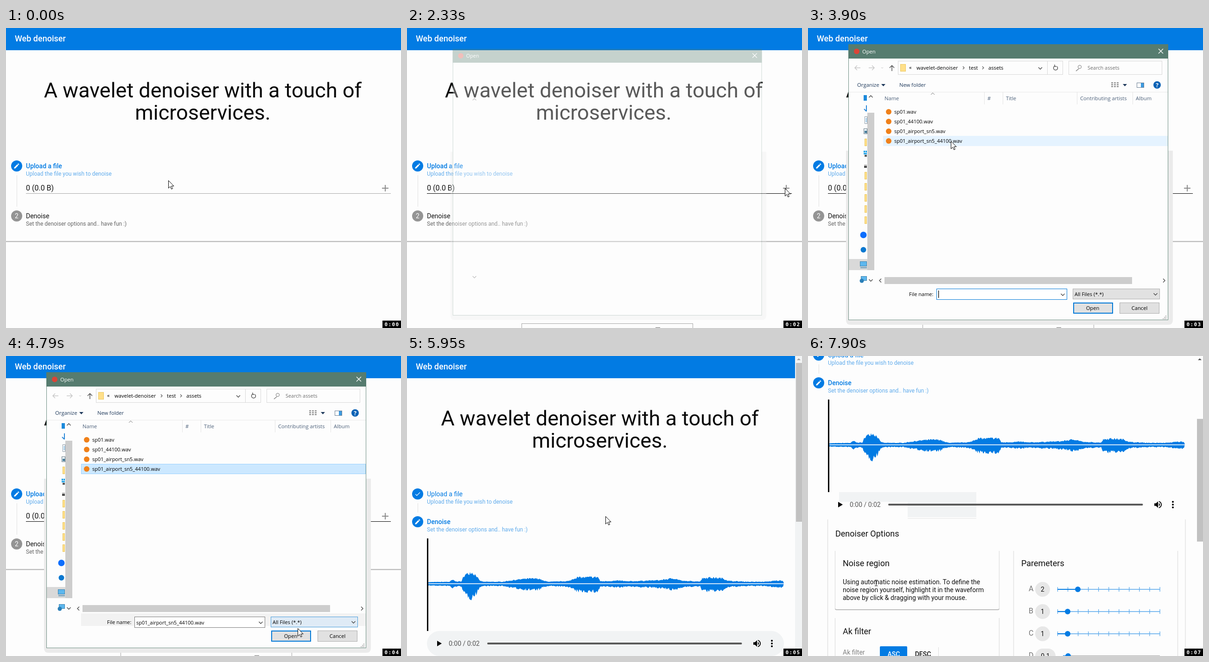
An HTML page for the animation above (8000 ms loop, 852 by 648 pixels).

```html
<!DOCTYPE html>
<html lang="en">
<head>
<meta charset="utf-8">
<title>Web denoiser</title>
<style>
html, body { margin: 0; width: 100%; height: 100%; overflow: hidden; background: #fdfdfd; }
svg { display: block; width: 852px; height: 648px; font-family: Roboto, sans-serif; }
text { white-space: pre; }
.ui { font-family: "Open Sans", sans-serif; }
.mid { text-anchor: middle; }
</style>
</head>
<body>
<svg id="stage" viewBox="0 0 852 648"></svg>
<script>
const BLUE = '#027be3', SOFT = '#5fabec', BG = '#fdfdfd', INK = '#111';

const text = (x, y, s, size = 14, fill = INK, extra = '') =>
  `<text x="${x}" y="${y}" font-size="${size}" fill="${fill}" ${extra}>${s}</text>`;
const ui = (x, y, s, fill = '#000', size = 11.2, cls = '') =>
  text(x, y, s, size, fill, `class="ui ${cls}"`);
const rect = (x, y, w, h, fill, extra = '') =>
  `<rect x="${x}" y="${y}" width="${w}" height="${h}" fill="${fill}" ${extra}/>`;
const box = (x, y, w, h, fill, stroke, extra = '') =>
  rect(x + .5, y + .5, w - 1, h - 1, fill, `stroke="${stroke}" ${extra}`);
const line = (d, stroke, w = 1, extra = '') =>
  `<path d="${d}" fill="none" stroke="${stroke}" stroke-width="${w}" ${extra}/>`;
const shape = (d, fill, extra = '') => `<path d="${d}" fill="${fill}" ${extra}/>`;
const dot = (x, y, r, fill) => `<circle cx="${x}" cy="${y}" r="${r}" fill="${fill}"/>`;
const icon = (d, x, y, k, fill) => shape(d, fill, `transform="translate(${x} ${y}) scale(${k}) translate(-12 -12)"`);
const chevron = (x, y, dx, dy, c = '#444', w = 1.3) => dx
  ? line(`M${x - dx} ${y - 4}L${x + dx} ${y}L${x - dx} ${y + 4}`, c, w)
  : line(`M${x - 4} ${y - dy}L${x} ${y + dy}L${x + 4} ${y - dy}`, c, w);
const group = (id, body, extra = '') => `<g id="${id}" ${extra}>${body}</g>`;

const PENCIL = 'M3 17.25V21h3.75L17.81 9.94l-3.75-3.75L3 17.25zM20.71 7.04c.39-.39.39-1.02 0-1.41l-2.34-2.34c-.39-.39-1.02-.39-1.41 0l-1.83 1.83 3.75 3.75 1.83-1.83z';
const CHECK = 'M9 16.17L4.83 12l-1.42 1.41L9 19 21 7l-1.41-1.41z';
const SOUND = 'M3 9v6h4l5 5V4L7 9H3zm13.5 3c0-1.77-1.02-3.29-2.5-4.03v8.05c1.48-.73 2.5-2.25 2.5-4.02zM14 3.23v2.06c2.89.86 5 3.54 5 6.71s-2.11 5.85-5 6.71v2.06c4.01-.91 7-4.49 7-8.77s-2.99-7.86-7-8.77z';

const top_ = (w, cx) => rect(0, 0, w, 48, BLUE) +
  text(19, 28.5, 'Web denoiser', 18, '#fff', 'font-weight="500"') +
  text(cx, 149.5, 'A wavelet denoiser with a touch of', 45, '#0a0a0a', 'class="mid"') +
  text(cx, 197.5, 'microservices.', 45, '#0a0a0a', 'class="mid"');

const step = (y, mark, title, sub, bold, titleFill, subFill) =>
  dot(23, y, 12, mark ? BLUE : '#949494') +
  (mark ? icon(mark, 23, y, .6, '#fff') : text(23, y + 5, '2', 14, '#fff', 'class="mid"')) +
  text(43, y + 5, title, 14, titleFill, `font-weight="${bold ? 500 : 400}"`) +
  text(43, y + 21, sub, 12, subFill);

const UPLOAD = ['Upload a file', 'Upload the file you wish to denoise'];
const DENOISE = ['Denoise', 'Set the denoiser options and.. have fun :)'];

function uploadPage() {
  return top_(852, 424.5) +
    step(298, PENCIL, ...UPLOAD, true, BLUE, SOFT) +
    step(406, '', ...DENOISE, false, INK, '#666') +
    line('M23.5 318V386', '#e0e0e0') +
    text(43, 351, '0 (0.0 B)', 16, INK) +
    line('M43 357.5H830', '#a6a6a6', 1, 'id="underline"') +
    line('M811 346H825M818 339V353', '#8c8c8c', 2) +
    rect(0, 460, 852, 2, '#bcbcbc') + rect(0, 462, 852, 1, '#e8e8e8');
}

function waveform() {
  const env = [[46, 3], [92, 4], [98, 9], [105, 5], [118, 5], [122, 19], [138, 29], [150, 20], [156, 7],
    [165, 4], [205, 4], [235, 9], [260, 12], [285, 12], [295, 6], [310, 4], [350, 6], [365, 15],
    [412, 16], [417, 5], [460, 7], [475, 5], [520, 7], [545, 8], [575, 13], [595, 6], [632, 5],
    [637, 13], [650, 15], [680, 13], [695, 6], [740, 4], [770, 4], [800, 7], [813, 7]];
  let seed = 7;
  const rnd = () => (seed = seed * 16807 % 2147483647) / 2147483647;
  let up = '', down = '';
  for (let x = 46; x <= 812; x += 1.5) {
    const a = track(env, x)[0];
    up += `L${x} ${(491 - a * (.68 + .3 * rnd())).toFixed(1)}`;
    down = `L${x} ${(492.5 + a * (.75 + .5 * rnd())).toFixed(1)}` + down;
  }
  return shape('M46 491' + up + 'L813 491' + down + 'Z', BLUE) + rect(46, 491, 767, 1.6, '#fff');
}

const card = (x, y, w, h) =>
  line(`M${x + .5} ${y + 4}V${y + h - 2}M${x + w - .5} ${y + 4}V${y + h - 2}`, '#e2e2e2', 1.5) +
  line(`M${x + 1} ${y + h - 2}q0 2 3 2H${x + w - 4}q3 0 3 -2`, '#bdbdbd', 1.8);

function slider(name, value, y, knob, x0 = 538, wide = 0) {
  const c = wide ? '#a0a0a0' : '#7dbbf0';
  let ticks = '';
  for (let i = 0; i <= 10 && !wide; i++) ticks += `M${538.5 + 22.05 * i} ${y - 5}v10`;
  return text(476, y + 4, name, 16, '#757575') +
    rect(490, y - 16, 32 + wide, 32, '#e7e7e7', 'rx="16"') +
    text(506 + wide / 2, y + 5, value, 14, INK, 'class="mid"') +
    line(`M${x0} ${y}H759`, c, 1.8) + line(ticks, SOFT, 1.3) +
    line(`M${x0} ${y}H${knob}`, BLUE, 2.2) + dot(knob, y, 6, BLUE);
}

function denoisePage() {
  const content = rect(43, 394, 3, 200, '#000') + waveform() +
    rect(43, 594, 770, 54, '#f1f3f4', 'id="pill" rx="27"') +
    group('patch', shape('M67 594H363V648H215V615H67Z', '#f1f3f4') + rect(215, 650, 148, 1.5, '#ececec')) +
    shape('M65 615L75 621L65 627Z', '#000') +
    text(90, 626, '0:00 / 0:02', 14, '#555') +
    rect(173, 619, 549.5, 4, '#5a5a5a', 'rx="2"') + icon(SOUND, 755, 621, .88, '#000') +
    [615, 621, 627].map(y => dot(787, y, 2, '#000')).join('') +
    line('M42.5 653V1400M814 653V1400', '#e2e2e2', 1.5) +
    text(59, 690, 'Denoiser Options', 18) +
    card(58, 717, 355, 131) + text(75, 754, 'Noise region', 18) +
    ['Using automatic noise estimation. To define the', 'noise region yourself, highlight it in the waveform',
      'above by click &amp; dragging with your mouse.'].map((s, i) => text(75, 793 + 17 * i, s)).join('') +
    card(58, 862, 355, 200) + text(75, 901, 'Ak filter', 18) + text(75, 945, 'Ak filter', 14, '#808080') +
    rect(155, 927, 59, 36, BLUE, 'rx="2"') + line('M281.5 929V963', '#ddd') +
    text(185, 949, 'ASC', 14, '#fff', 'class="mid" font-weight="500"') +
    text(248, 949, 'DESC', 14, INK, 'class="mid" font-weight="500"') +
    card(443, 717, 355, 400) + text(460, 754, 'Paremeters', 18) +
    slider('A', '2', 804, 582) + slider('B', '1', 852, 560) + slider('C', '1', 900, 560) +
    slider('D', '0.1', 948, 561, 550, 12);
  return top_(837, 416) + step(298, CHECK, ...UPLOAD, false, BLUE, SOFT) +
    line('M23.5 318V338', '#e0e0e0') +
    group('second', step(358, PENCIL, ...DENOISE, true, BLUE, SOFT) + group('content', content));
}

function folder(x, y, w = 5) { return box(x, y, w, 16, '#ffe08a', '#ecc860'); }

function sidebar() {
  return rect(88, 499, 40, 24, '#d9d9d9') +
    rect(120, 145, 7, 12, '#1c8adb') +
    line('M126 167V180M121 175L126 180', '#2b88d8', 2) +
    box(122, 191, 6, 16, '#fff', '#8a9aa8') + line('M124 196h3M124 199h3M124 202h3', '#3b9be0') +
    box(120, 217, 8, 12, '#e9f3fa', '#6d7c88') + rect(122, 222, 5, 5, '#4a7f9c') +
    rect(120, 265, 3, 4, '#1ca0e6') + rect(124, 265, 3, 4, '#1ca0e6') + rect(120, 270, 7, 3, '#1ca0e6') + rect(122, 274, 5, 4, '#555') +
    rect(121, 295, 6, 3, '#bbb') + rect(121, 298, 6, 4, '#444') +
    [239, 311, 335, 359, 383, 407].map(y => folder(122, y)).join('') +
    dot(119.5, 447, 7, '#0d6efd') + dot(119.5, 479, 6, '#0a78d0') +
    box(112, 504, 15, 11, '#5db7ee', '#3f83ad') + rect(113, 517, 14, 1.5, '#3f83ad') +
    box(114, 536, 13, 10, '#5db7ee', '#3f83ad') + dot(116, 546, 4.5, '#2a7fb8') +
    rect(128, 183, 15, 340, '#cdcdcd');
}

function dialogBody() {
  const grey = '#c4c4c4', navy = '#1e395b', head = '#4c607a';
  const arrow = (x, c) => line(`M${x - 6} 86H${x + 6}`, c, 1.4);
  const names = ['sp01.wav', 'sp01_44100.wav', 'sp01_airport_sn5.wav', 'sp01_airport_sn5_44100.wav'];
  let grip = '';
  for (let i = 0; i < 3; i++) for (let j = 2 - i; j < 3; j++) grip += rect(765 + 3 * j, 621 + 3 * i, 2, 2, '#b4b4b4');
  return arrow(107, grey) + line('M106 81L101 86L106 91', grey, 1.4) +
    arrow(137, grey) + line('M138 81L143 86L138 91', grey, 1.4) + line('M158 85l2 2l2 -2', grey) +
    line('M181 93V81M176 86L181 81L186 86', '#555', 1.5) +
    box(194, 71, 356, 30, BG, '#d9d9d9') + line('M516.5 72V100', '#d9d9d9') +
    folder(199, 78, 12) + ui(218, 89, '«') + ui(234, 90, 'wavelet-denoiser') + ui(347, 90, 'test') + ui(389, 90, 'assets') +
    line('M334 83l3 3l-3 3M376 83l3 3l-3 3', '#555', 1.2) + chevron(501, 87, 0, 2) +
    line('M537 83A4.5 4.5 0 1 1 532 82.3M532 79V83H536', '#555', 1.4) +
    box(562, 71, 202, 30, BG, '#d9d9d9') + line('M584 88L578 93', '#777', 1.3) +
    '<circle cx="586" cy="84" r="3.6" fill="none" stroke="#777"/>' + ui(603, 90, 'Search assets', '#6d6d6d', 10.9) +
    ui(106, 127, 'Organize', navy, 11.4) + shape('M158 121H167L162.5 126Z', navy) + ui(197, 127, 'New folder', navy) +
    [0, 1, 2].map(i => line(`M654 ${118.5 + 4 * i}h4M660 ${118.5 + 4 * i}h4M666 ${118.5 + 4 * i}h4`, '#7a7a7a', 2)).join('') +
    shape('M679 121H688L683.5 126Z', navy) +
    box(709, 118, 16, 11, '#fff', '#6a7f94') + rect(718, 119, 6, 9, '#3d9ae0') +
    dot(753, 123, 8, '#0b62b5') + text(753, 127.5, '?', 12, '#fff', 'class="ui mid" font-weight="700"') +
    line('M88 138.5H776', '#e8e8e8') + line('M380.5 139V165M420.5 139V165M580.5 139V165M700.5 139V165', '#e5e5e5') +
    chevron(269, 142, 0, -2, '#777', 1) +
    ui(165, 156, 'Name', head) + ui(387, 156, '#', head) + ui(427, 156, 'Title', head) +
    ui(587, 156, 'Contributing artists', head) + ui(707, 156, 'Album', head) +
    box(162, 233, 614, 22, '#e5f3ff', '#e5f3ff', 'id="row"') +
    names.map((s, i) => dot(174, 181 + 21 * i, 6, '#f08019') + ui(186, 185 + 21 * i, s, '#000', 10.95)).join('') +
    sidebar() + rect(165, 538, 534, 15, '#cdcdcd') +
    chevron(156, 545.5, -2, 0) + chevron(768, 545.5, 2, 0) +
    rect(162, 556, 614, 27, '#f2f2f2', 'id="strip"') +
    ui(218, 579, 'File name:', '#000', 11) +
    box(277, 563, 282, 24, '#fff', BLUE, 'id="field"') + chevron(549.5, 576, 0, 2) +
    rect(281, 567, 1.3, 16, '#000', 'id="caret"') +
    group('picked', ui(281, 580, names[3], '#000', 10.95)) +
    box(571, 563, 188, 23, '#e1e1e1', '#adadad', 'id="combo"') + chevron(749.5, 575, 0, 2) + ui(575, 579, 'All Files (*.*)', '#000', 11) +
    rect(573, 594, 84, 22, '#e1e1e1', 'id="ok" stroke="#0078d7" stroke-width="2"') + ui(614, 609, 'Open', '#000', 11.2, 'mid') +
    box(672, 593, 86, 24, '#e1e1e1', '#adadad') + ui(715, 609, 'Cancel', '#000', 11.2, 'mid') + grip;
}

function dialog() {
  return shape('M82 265H787V631Q787 641 777 641H92Q82 641 82 631Z', '#ebebeb') +
    box(87, 35, 690, 596, BG, '#6f8f84') + rect(87, 35, 690, 31, '#567c6f') +
    dot(105, 50.5, 6, '#db4437') + ui(117, 55, 'Open', '#fff') +
    line('M756 45L766 55M766 45L756 55', '#fff', 1.3) +
    chevron(135.5, 148, 0, -2) + chevron(135.5, 545, 0, 2) + group('body', dialogBody());
}

// Piecewise linear lookup of [key, ...values] rows
function track(rows, t) {
  if (t <= rows[0][0]) return rows[0].slice(1);
  const i = rows.findIndex(r => r[0] >= t);
  if (i < 0) return rows[rows.length - 1].slice(1);
  const a = rows[i - 1], b = rows[i], k = (t - a[0]) / (b[0] - a[0]);
  return a.slice(1).map((v, j) => v + (b[j + 1] - v) * k);
}

const POINTER = [[120, 350, 329], [300, 460, 316], [820, 833, 343], [940, 835, 345], [1160, 825, 361], [1440, 825, 361],
  [1500, 839, 366], [1650, 839, 366], [1850, 808, 339], [1980, 815, 346], [2680, 815, 346], [3080, 581, 292],
  [3540, 330, 262], [3700, 312, 245], [4350, 300, 243], [4500, 330, 262], [4790, 629, 588], [4950, 622, 600],
  [5380, 620, 602], [5850, 428, 346], [6270, 428, 346], [6600, 399, 238], [7150, 399, 238], [7350, 352, 294],
  [7550, 215, 390], [7800, 148, 488], [7900, 147, 490]];
const SCROLL = [[6200, 0], [6400, 60], [6830, 209], [6880, 209], [7000, 265], [7200, 300]];

const stage = document.getElementById('stage');
stage.innerHTML = rect(0, 0, 852, 648, BG) +
  group('upload', uploadPage()) + group('denoise', denoisePage()) +
  group('bar', rect(837, 0, 15, 648, '#f1f3f4', 'id="rail"') +
    rect(839, 15, 13, 343, '#c1c1c1', 'id="thumb"') + shape('M841 9L845 5L849 9Z', '#505050', 'id="upArrow"')) +
  group('popup', box(247, 638, 370, 12, BG, '#a6a6a6') + rect(536, 646.5, 10, 1.5, '#999')) +
  group('dialog', dialog()) +
  group('arrow', '<path d="M.5 .5V17L4.3 13.4L6.8 19L9.3 18L6.9 12.4H12Z" fill="#fff" stroke="#000"/>') +
  group('beam', line('M-3 -6h2.5M.5 -6H3M0 -5.5V6M-3 6.5h2.5M.5 6.5H3', '#000')) +
  rect(812, 632, 40, 16, '#000') +
  text(816.5, 643.5, '', 11, '#fff', 'id="clock" font-weight="700" letter-spacing="1.4" style="font-family:\'DejaVu Sans Mono\',monospace"');

const el = id => document.getElementById(id);
const set = (id, attrs) => { for (const k in attrs) el(id).setAttribute(k, attrs[k]); };
const show = (id, on) => set(id, { visibility: on ? 'inherit' : 'hidden' });
const within = (t, a, b) => t >= a && t < b;

function draw(t) {
  const late = t >= 5600, picked = t >= 4350;
  show('upload', !late); show('denoise', late); show('bar', late);
  set('underline', { stroke: within(t, 220, 900) || t >= 1050 ? '#000' : '#a6a6a6' });

  show('dialog', within(t, 2330, 5490)); show('popup', within(t, 2330, 5490));
  const k = t < 2430 ? .33 : t < 2530 ? .8 : t < 5380 ? 1 : .5;
  set('dialog', { opacity: k, transform: `translate(432 333) scale(${.95 + .05 * k}) translate(-432 -333)` });
  show('body', t >= 2430);
  show('row', t >= 3640);
  set('row', picked ? { fill: '#cce8ff', stroke: '#99d1ff' } : { fill: '#e5f3ff', stroke: '#e5f3ff' });
  show('strip', picked); show('picked', picked);
  show('caret', !picked && (t + 420) % 1060 < 530);
  set('field', { stroke: picked ? '#7a7a7a' : '#0078d7' });
  const over = within(t, 4680, 4900);
  set('combo', { fill: over ? '#dfebf6' : '#e1e1e1', stroke: over ? '#4a9ddb' : '#adadad' });
  set('ok', { fill: t >= 4900 ? '#e5f1fb' : '#e1e1e1' });

  const open = 1 - Math.pow(1 - Math.min(1, Math.max(0, (t - 5600) / 220)), 3);
  const [y] = track(SCROLL, t), moved = t >= 6200;
  set('denoise', { transform: `translate(0 ${-y})` });
  set('second', { transform: `translate(0 ${48 * (1 - open)})` });
  set('content', { opacity: open });
  show('pill', !moved); show('rail', late && !moved); show('patch', t >= 7450);
  set('thumb', moved ? { y: 14 + .406 * y, height: 265 } : { y: 15, height: 343 });
  set('upArrow', { fill: moved ? '#505050' : '#a3a3a3' });

  const at = `translate(${track(POINTER, t).map(Math.round).join(' ')})`, typing = t >= 7750;
  set('arrow', { transform: at }); set('beam', { transform: at });
  show('arrow', !typing); show('beam', typing);
  el('clock').textContent = '0:0' + Math.floor((t + 20) / 1000) % 8;
}

const start = performance.now();
function tick() {
  draw((performance.now() - start) % 8000);
  requestAnimationFrame(tick);
}
tick();
</script>
</body>
</html>
```
